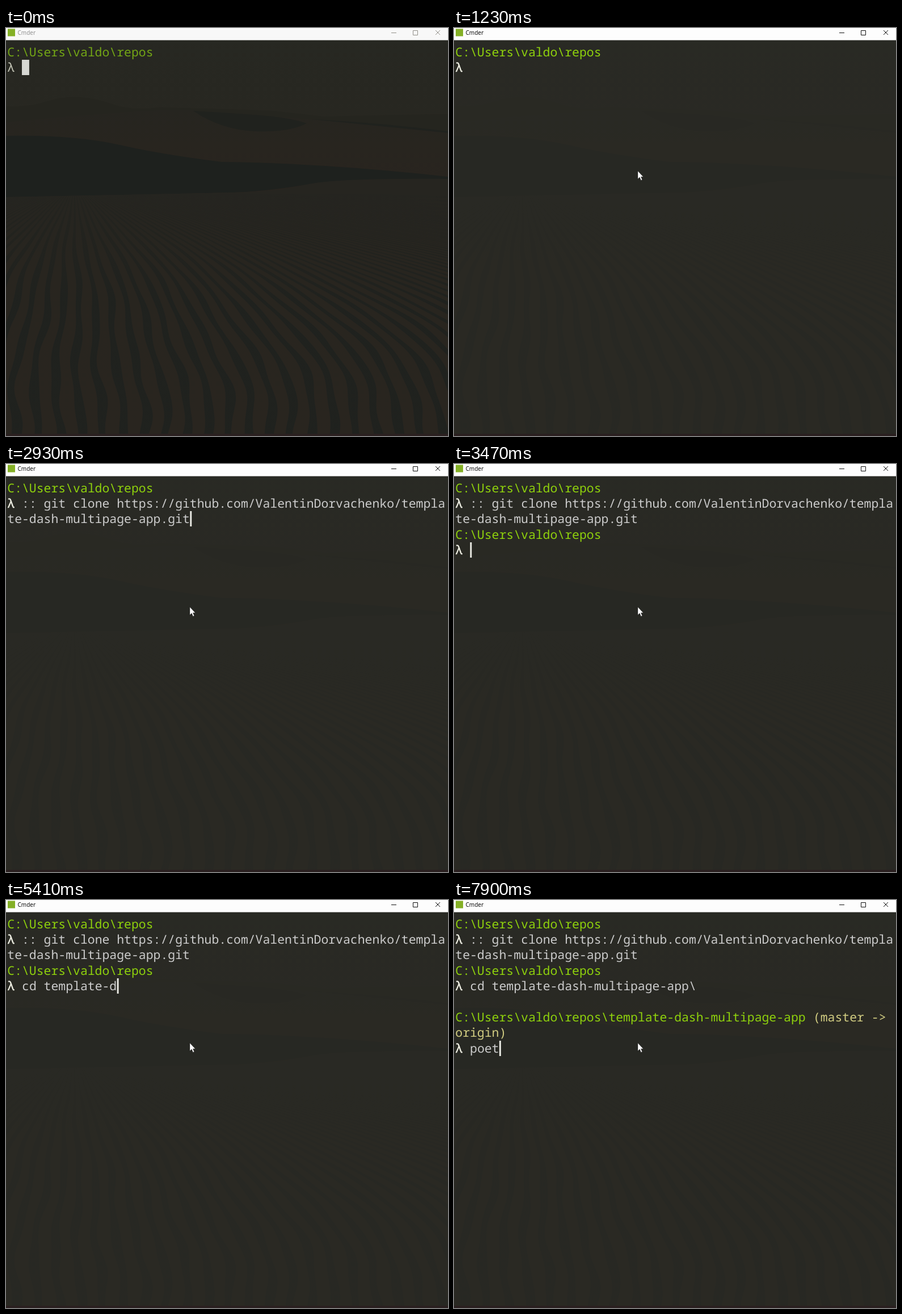
An HTML page for the animation above (8 s loop, 779 by 719 pixels).

```html
<!DOCTYPE html>
<html lang="en">
<head>
<meta charset="utf-8">
<title>Terminal</title>
<style>
  html, body { margin: 0; width: 100%; height: 100%; overflow: hidden; background: #2a2a24; }
  svg { display: block; width: 779px; height: 719px; }
  #rows text {
    font: 21.45px "Noto Sans Mono", "DejaVu Sans Mono", monospace;
    white-space: pre;
    text-rendering: geometricPrecision;
    font-variant-ligatures: none;
  }
  .path { fill: #8fd20c; }
  .lambda { fill: #f6f6ea; stroke: #f6f6ea; stroke-width: .4px; }
  .cmd { fill: #cccccc; }
  .branch { fill: #d2cd82; }
  .idle .path { fill: #73a615; }
  .idle .lambda { fill: #c9cabb; stroke: none; }
  #title { font: 10px "Noto Sans", "Open Sans", sans-serif; fill: #111; }
  #buttons { fill: none; stroke: #111; stroke-width: 1; }
  #bar { fill: #fdfdfd; }
  .idle #title { fill: #929292; }
  .idle #buttons { stroke: #929089; }
  .idle #bar { fill: #f8f8f8; }
  .idle #veil { display: none; }
  #caret { fill: #ecece6; }
  .idle #caret { fill: #d6d7d2; }
</style>
</head>
<body>
<svg id="stage" class="idle" viewBox="0 0 779 719">
  <defs>
    <linearGradient id="sky" x1="0" y1="0" x2="0" y2="1">
      <stop offset="0" stop-color="#272822"/>
      <stop offset="1" stop-color="#282620"/>
    </linearGradient>
    <linearGradient id="hill" x1="0" y1="0" x2="0" y2="1">
      <stop offset="0" stop-color="#262520"/>
      <stop offset=".4" stop-color="#28251f"/>
      <stop offset="1" stop-color="#29241f"/>
    </linearGradient>
    <linearGradient id="sand" gradientUnits="userSpaceOnUse" x1="0" y1="295" x2="0" y2="719">
      <stop offset="0" stop-color="#262520"/>
      <stop offset=".3" stop-color="#28251f"/>
      <stop offset="1" stop-color="#29251f"/>
    </linearGradient>
    <linearGradient id="shade" gradientUnits="userSpaceOnUse" x1="0" y1="292" x2="0" y2="480">
      <stop offset="0" stop-color="#1e211e" stop-opacity=".3"/>
      <stop offset="1" stop-color="#1e211e" stop-opacity=".85"/>
    </linearGradient>
  </defs>

  <rect width="779" height="300" fill="url(#sky)"/>
  <path d="M0 138Q40 140 70 130T130 122T190 135T270 140L390 143L470 146L560 156L700 153L779 152V200H0Z" fill="#25251f"/>
  <path d="M0 166Q100 156 200 149T340 146Q450 154 560 163T779 183V300H0Z" fill="url(#hill)"/>
  <path d="M330 146Q400 150 450 154T530 168Q500 184 440 182T330 146Z" fill="#20221e"/>
  <path d="M540 161Q650 166 779 182V185Q650 172 540 161Z" fill="#20221e"/>
  <path d="M0 190Q120 188 200 206T380 236Q560 238 779 262V267Q600 264 530 276T400 290L0 298Z" fill="#1e211e"/>
  <path d="M0 298L400 290Q480 288 530 276T779 266V719H0Z" fill="url(#sand)"/>
  <path id="ripples" fill="url(#shade)"/>
  <rect id="veil" y="21" width="779" height="698" fill="#2b2b25" opacity=".76"/>
  <rect y="715" width="779" height="4" fill="#2a2020"/>

  <rect id="bar" width="779" height="21.5"/>
  <rect x="3" y="1.5" width="13" height="13" fill="#84b026"/>
  <text id="title" x="20.5" y="12">Cmder</text>
  <path id="buttons" d="M679 8.5h9M717.5 4.5h8v8h-8zM757 4l8 8M765 4l-8 8"/>

  <g id="rows"></g>
  <rect id="caret" height="27"/>
  <path id="mouse" d="M0 0V14L3.2 11L5.6 16.4L7.8 15.4L5.5 10.3H9.6Z" fill="#fff" stroke="#111" stroke-width=".4"/>
</svg>
<script>
const $ = id => document.getElementById(id);
const LOOP = 8000, ACTIVE = 690;
const home = 'C:\\Users\\valdo\\repos';
const project = 'template-dash-multipage-app';

// each row is a list of [style, text]
const rows = [
  [['path', home]],
  [['lambda', 'λ '], ['cmd', ':: git clone https://github.com/ValentinDorvachenko/templa']],
  [['cmd', 'te-dash-multipage-app.git']],
  [['path', home]],
  [['lambda', 'λ '], ['cmd', `cd ${project}\\`]],
  [],
  [['path', `${home}\\${project}`], ['branch', ' (master ->']],
  [['branch', 'origin)']],
  [['lambda', 'λ '], ['cmd', 'poet']]
];

// caret position: [time, row, column]
const steps = [
  [0, 1, 2], [2240, 1, 3], [2400, 1, 4], [2560, 1, 5], [2860, 1, 60], [2930, 2, 25],
  [3420, 3, 0], [3470, 4, 2], [4330, 4, 3], [4413, 4, 4], [4497, 4, 5], [4580, 4, 6],
  [4800, 4, 7], [4950, 4, 14], [5410, 4, 15], [5650, 4, 33], [6510, 8, 2],
  [7590, 8, 3], [7680, 8, 4], [7820, 8, 5], [7900, 8, 6]
];
const caretOff = [[1230, 1770], [2860, 2930], [4020, 4330], [6120, 6510], [7060, 7590]];
const mouseOff = [[0, 70], [2240, 2560]];

const colX = c => 2.28 + c * 12.87;
const rowY = r => Math.round(28.6 + r * 27.4);
const within = (t, spans) => spans.some(([a, b]) => t >= a && t < b);
const show = (el, on) => el.setAttribute('visibility', on ? 'visible' : 'hidden');

const spans = [];
rows.forEach((parts, row) => {
  let col = 0;
  for (const [style, text] of parts) {
    spans.push({ row, col, text, style });
    col += text.length;
  }
});
$('rows').innerHTML = spans.map(s =>
  `<text class="${s.style}" x="${colX(s.col)}" y="${rowY(s.row) + 21}"></text>`).join('');
spans.forEach((s, i) => { s.el = $('rows').children[i]; });

// sand ripples converging towards the horizon
function rippleX(i, y) {
  const u = (719 - y) / 427;
  const scale = 1 - 0.92 * Math.pow(u, 2.1);
  const wave = 6 * Math.sin(y / 36 + i * 0.25) + 2 * Math.sin(y / 15 - i * 0.9);
  return 120 + ((i - 3) * 38 + wave) * scale;
}
function ripples() {
  let d = '';
  for (let i = -45; i < 225; i++) {
    const left = [], right = [];
    for (let y = 719; y >= 292; y -= 7) {
      const x = rippleX(i, y);
      if (x < -60 || x > 840) continue;
      const w = 0.4 + 0.08 * Math.sin(y / 21 + i * 2.1);
      left.push(`${x.toFixed(1)} ${y}`);
      right.unshift(`${(x + (rippleX(i + 1, y) - x) * w).toFixed(1)} ${y}`);
    }
    if (left.length > 1) d += `M${left.concat(right).join('L')}Z`;
  }
  return d;
}
$('ripples').setAttribute('d', ripples());

function draw(t) {
  const idle = t < ACTIVE;
  $('stage').setAttribute('class', idle ? 'idle' : '');

  const [, row, col] = steps.filter(s => s[0] <= t).pop();
  for (const s of spans) {
    const count = s.row < row ? s.text.length : s.row > row ? 0 : Math.max(0, col - s.col);
    const text = s.text.slice(0, count);
    if (s.el.textContent !== text) s.el.textContent = text;
  }

  const caret = $('caret');
  caret.setAttribute('x', colX(col) + (idle ? 0 : 0.35));
  caret.setAttribute('y', rowY(row));
  caret.setAttribute('width', idle ? 12.87 : 2.9);
  show(caret, !within(t, caretOff));

  const p = Math.min(1, Math.max(0, (t - 70) / 540));
  const ease = p * p * (3 - 2 * p);
  $('mouse').setAttribute('transform', `translate(${345 - 21 * ease} ${679 - 427 * ease})`);
  show($('mouse'), !within(t, mouseOff));
}

const start = performance.now();
function tick() {
  draw((performance.now() - start) % LOOP);
  requestAnimationFrame(tick);
}
draw(0);
requestAnimationFrame(tick);
</script>
</body>
</html>
```
